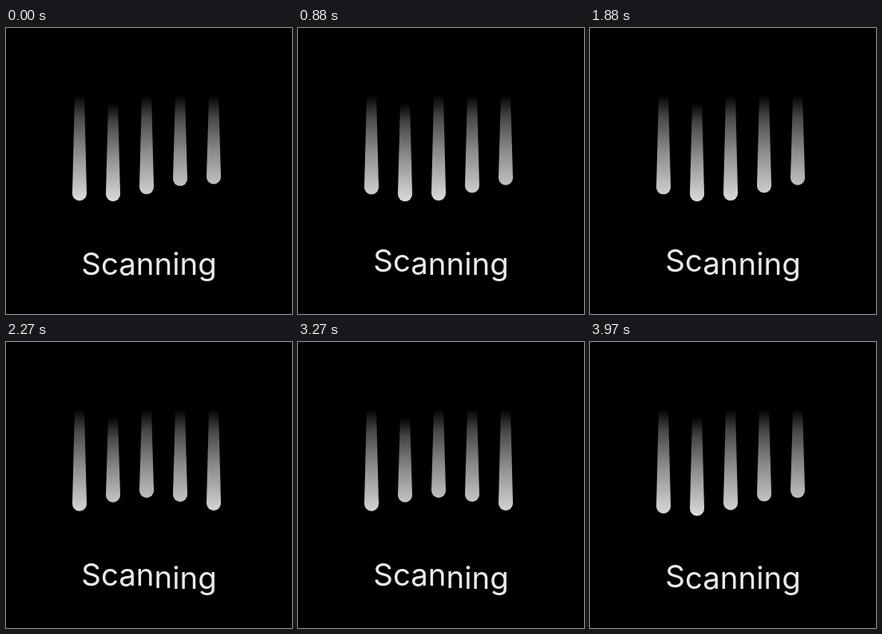
An HTML page that plays this animation: 358 px wide and 358 px high, repeating every 4 s.

```html
<!DOCTYPE html>
<html lang="en">
<head>
<meta charset="utf-8">
<title>Scanning</title>
<style>
  html, body { margin: 0; width: 100%; height: 100%; overflow: hidden; background: #000; }
  svg { display: block; width: 100vw; height: 100vh; }
  text { font: 400 38.4px Inter, "Liberation Sans", sans-serif; fill: #ebebeb; text-anchor: middle; }
</style>
</head>
<body>
<svg id="stage" viewBox="0 0 358 358">
  <defs></defs>
  <text id="label" x="179" y="309">Scanning</text>
</svg>
<script>
const NS = "http://www.w3.org/2000/svg";
const LOOP = 4000, FPS = 30, LAST = 119;
const RADIUS = 9, MID = 197.5, SWING = 11.5, RISE = 4;
const TOPS = [84, 94, 84, 84, 84];
const SHADES = [[0, "#000"], [0.2, "#464646"], [0.5, "#868686"], [0.87, "#c6c6c6"], [1, "#dcdcdc"]];

const stage = document.getElementById("stage");
const defs = stage.querySelector("defs");
const label = document.getElementById("label");
const letters = label.textContent.length;

function add(parent, tag, attrs) {
  const node = document.createElementNS(NS, tag);
  for (const key in attrs) node.setAttribute(key, attrs[key]);
  return parent.appendChild(node);
}

const bars = TOPS.map((top, i) => {
  const fade = add(defs, "linearGradient", {
    id: "fade" + i, gradientUnits: "userSpaceOnUse", x1: 0, x2: 0, y1: top, y2: 218
  });
  SHADES.forEach(([offset, color]) => add(fade, "stop", { offset, "stop-color": color }));
  return { x: 92 + 42 * i, top, path: add(stage, "path", { fill: `url(#fade${i})` }) };
});

// Tapered body with a round cap centred at height y
function barPath(x, top, y) {
  const half = 6;
  return `M${x - half} ${top}H${x + half}L${x + RADIUS} ${y}` +
    `A${RADIUS} ${RADIUS} 0 0 1 ${x - RADIUS} ${y}Z`;
}

function draw(time) {
  const step = Math.min(LAST, Math.max(0, Math.ceil(time * FPS / 1000 - 0.5)));
  const phase = (step % FPS) / FPS;

  bars.forEach((bar, i) => {
    const y = MID + SWING * Math.sin(2 * Math.PI * phase + i + 1);
    bar.path.setAttribute("d", barPath(bar.x, bar.top, y));
  });

  // Letters lift one by one from the left, then drop back from the right
  const reach = (1 - Math.abs(2 * phase - 1)) * letters;
  let previous = 0;
  const shifts = Array.from({ length: letters }, (_, i) => {
    const lift = -RISE * Math.min(1, Math.max(0, reach - i));
    const shift = lift - previous;
    previous = lift;
    return shift.toFixed(3);
  });
  label.setAttribute("dy", shifts.join(" "));
}

const start = performance.now();
function tick() {
  draw((performance.now() - start) % LOOP);
  requestAnimationFrame(tick);
}
tick();
</script>
</body>
</html>
```
